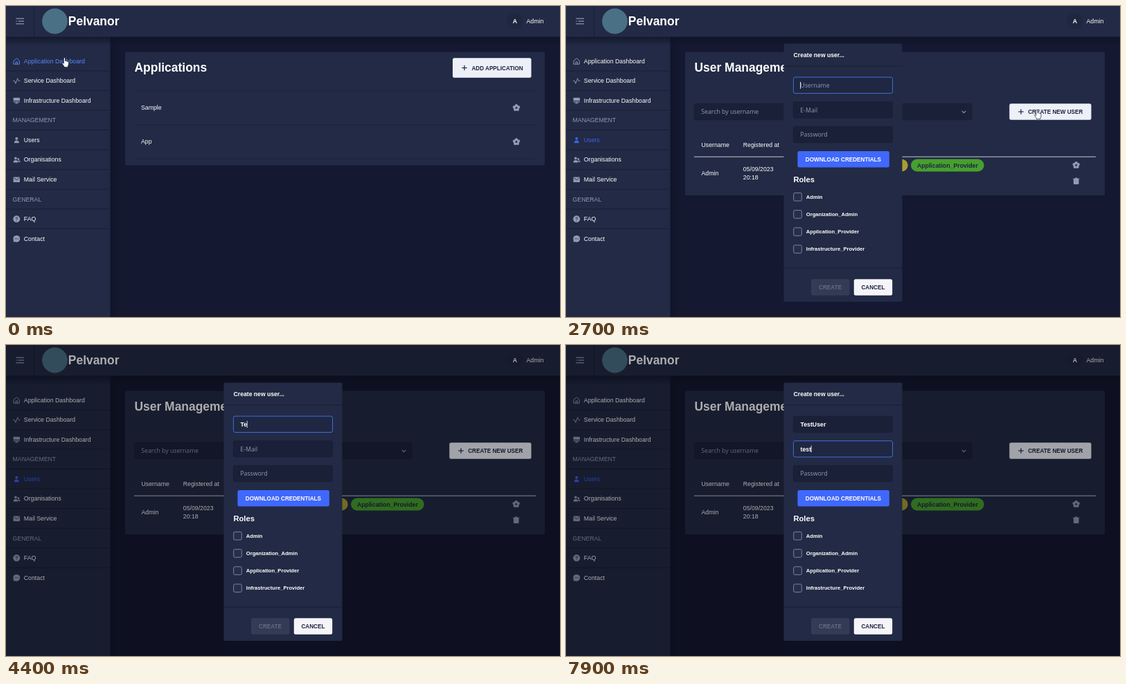
An HTML page for the animation above (8000 ms loop, 800x450 px).

```html
<!DOCTYPE html>
<html lang="en">
<head>
<meta charset="utf-8">
<title>User management</title>
<style>
html, body { margin: 0; width: 100%; height: 100%; overflow: hidden; background: #141830; }
svg { display: block; width: 800px; height: 450px; }
text { font-family: "Liberation Sans", Arial, sans-serif; font-size: 8.75px; fill: #fff; white-space: pre; }
.b { font-weight: 700; }
.o { font-family: "Open Sans", "Noto Sans", sans-serif; fill: #8f9bb3; }
.g { fill: #8f9bb3; }
.h { font-weight: 700; font-size: 17.45px; }
.btn { font-weight: 700; font-size: 8.16px; }
.dark { fill: #1e2540; }
</style>
</head>
<body>
<svg id="stage" viewBox="0 0 800 450" xmlns="http://www.w3.org/2000/svg"></svg>
<script>
const LOOP = 8000, PAGE_AT = 1200, DIALOG_AT = 2700, TAB_AT = 6370, HIDE_AT = 4100;
const GREY = '#8f9bb3', ACTIVE = '#3c63e8', HOVER = '#5c87f8';
const PANEL = '#222a45', LINE = '#181e35', FIELD = '#1a2038';

const text = (x, y, s, cls = '', extra = '') => `<text x="${x}" y="${y}" class="${cls}" ${extra}>${s}</text>`;
const rect = (x, y, w, h, fill, r = 0, extra = '') =>
  `<rect x="${x}" y="${y}" width="${w}" height="${h}" rx="${r}" fill="${fill}" ${extra}/>`;
const line = (x1, y1, x2, y2, c, w = 1) =>
  `<path d="M${x1} ${y1}L${x2} ${y2}" stroke="${c}" stroke-width="${w}"/>`;
const icon = (x, y, body, s = .47) =>
  `<g transform="translate(${x} ${y}) scale(${s}) translate(-12 -12)">${body}</g>`;
const solid = d => `<path d="${d}" fill="currentColor"/>`;
const outline = d =>
  `<path d="${d}" fill="none" stroke="currentColor" stroke-width="2" stroke-linecap="round" stroke-linejoin="round"/>`;
const disc = (x, y, r, fill = 'currentColor') => `<circle cx="${x}" cy="${y}" r="${r}" fill="${fill}"/>`;

const ICONS = {
  home: outline('M3.5 10.5L12 3L20.5 10.5V21H3.5ZM9.5 21V14H14.5V21'),
  pulse: outline('M2 12H6L9 20L15 4L18 12H22'),
  screen: solid('M4 3H20Q22 3 22 5V12H2V5Q2 3 4 3ZM2 14H22V15Q22 17 20 17H13V19H17V21H7V19H11V17H4Q2 17 2 15Z'),
  person: disc(12, 7, 4.2) + solid('M4.5 21Q4.5 13 12 13T19.5 21Z'),
  people: disc(9, 7, 4) + disc(17.5, 10, 3) + solid('M2 20Q2 13 9 13T16 20ZM17.5 19H23Q23 14 17.5 14Q16.5 14 15.8 14.4Q17.5 16.5 17.5 19Z'),
  mail: solid('M4 4H20Q22 4 22 6V18Q22 20 20 20H4Q2 20 2 18V6Q2 4 4 4Z') +
    `<path d="M4 7L12 13L20 7" fill="none" stroke="${PANEL}" stroke-width="2"/>`,
  help: disc(12, 12, 10.5) +
    `<path d="M9 9.5Q9 7 12 7T15 9.5Q15 11.5 12 12V14M12 16.5V18.5" fill="none" stroke="${PANEL}" stroke-width="2"/>`,
  chat: disc(12, 12, 10.5) + solid('M2 22L3 14L10 21Z') + [8, 12, 16].map(x => disc(x, 12, 1.3, PANEL)).join('')
};

const ROW = 28.55;
const menu = [
  ['Application Dashboard', 'home'], ['Service Dashboard', 'pulse'], ['Infrastructure Dashboard', 'screen'],
  ['MANAGEMENT'], ['Users', 'person'], ['Organisations', 'people'], ['Mail Service', 'mail'],
  ['GENERAL'], ['FAQ', 'help'], ['Contact', 'chat']
];

function sidebar() {
  return rect(0, 44, 150.5, 406, PANEL) + menu.map(([label, name], i) => {
    const y = 79.6 + i * ROW;
    const row = name
      ? `<g id="item${i}">${icon(15.3, y + .3, ICONS[name])}${text(25.8, y + 3.1, label)}</g>`
      : text(9.5, y + 3.1, label, 'g');
    return row + (i < 9 ? line(0, y + 14.3, 150, y + 14.3, LINE) : '');
  }).join('');
}

function header() {
  return rect(0, 44, 800, 14, 'url(#down)') + rect(0, 0, 800, 44.5, PANEL) + line(40.5, 0, 40.5, 44, LINE) +
    line(14.5, 18.2, 26, 18.2, GREY, 1.2) + line(17.5, 22, 26, 22, GREY, 1.2) +
    line(14.5, 25.8, 26, 25.8, GREY, 1.2) + disc(15, 22, .8, GREY) +
    disc(70.5, 22, 18.4, '#4a7086') + text(89.8, 28.2, 'Pelvanor', 'h') +
    disc(735, 22, 11.5, '#1f2740') + text(735, 25.1, 'A', 'b', 'text-anchor="middle"') + text(751.5, 25.1, 'Admin');
}

function flower(x, y) {
  let petals = '';
  for (let i = 0; i < 5; i++) {
    const a = (i / 5 - .25) * 2 * Math.PI;
    petals += disc(12 + 6 * Math.cos(a), 12 + 6 * Math.sin(a), 4.6);
  }
  return icon(x, y, petals + disc(12, 12, 6) + disc(12, 12, 2.8, PANEL), .5);
}
const bin = (x, y) => icon(x, y, solid('M2 5H8V3Q8 2 9 2H15Q16 2 16 3V5H22V7H20V20Q20 22 18 22H6Q4 22 4 20V7H2Z'), .48);
const plus = (x, y) => line(x - 3.7, y, x + 3.7, y, '#1e2540', 1.2) + line(x, y - 3.7, x, y + 3.7, '#1e2540', 1.2);

function applications() {
  const rows = ['Sample', 'App'].map((s, i) => {
    const y = 147.3 + i * 49.2;
    return text(195, y + 2.8, s) + flower(737, y) + line(185, y + 24.6, 765, y + 24.6, '#1c233b');
  }).join('');
  return rect(172, 66.5, 606, 164, PANEL, 1.5) + text(185.5, 95.2, 'Applications', 'h') +
    rect(645, 75.3, 113.5, 28.5, '#edf0f7', 2.5) + plus(662, 89.5) +
    text(672.4, 92.5, 'ADD APPLICATION', 'btn dark') + line(185, 123, 765, 123, '#1c233b') + rows;
}

const chip = (x, y, w, fill, s) => rect(x, y, w, 18, fill, 9) + text(x + 8.9, y + 12.1, s, 'b dark');

function users() {
  const edge = 'stroke="#171d33" stroke-width=".7"';
  return rect(172, 66.5, 606, 207.5, PANEL, 1.5) + text(185.5, 95.2, 'User Management', 'h') +
    rect(185.2, 141.2, 193.3, 23.6, FIELD, 2.5, edge) + text(195.3, 156, 'Search by username', 'o') +
    rect(392, 141.2, 194, 23.6, FIELD, 2.5, edge) + text(403.3, 156, 'Multiple Select', 'o', 'style="font-size:8.45px"') +
    `<path d="M571.7 151.8L574.5 154.6L577.3 151.8" fill="none" stroke="${GREY}" stroke-width="1.1"/>` +
    rect(640.3, 141.2, 118.2, 23.6, '#edf0f7', 2.5) + plus(657, 153) + text(667.2, 156, 'CREATE NEW USER', 'btn dark') +
    text(195.5, 204, 'Username') + text(255.8, 204, 'Registered at') + text(340, 204, 'Roles') +
    line(185, 218.2, 765, 218.2, '#c5c8d3') +
    text(195.5, 244.7, 'Admin') + text(255.8, 239, '05/09/2023') + text(255.8, 250.5, '20:18') +
    chip(340, 221.5, 45, '#d8626a', 'Admin') + chip(389.7, 221.5, 104, '#a89e32', 'Organization_Admin') +
    chip(498, 221.5, 105.7, '#479f2f', 'Application_Provider') +
    chip(340, 244, 115.5, '#3b94a6', 'Infrastructure_Provider') +
    flower(736.7, 230.3) + bin(736.7, 253.2);
}

const fieldY = [103, 138.7, 174.3];
const hints = ['Username', 'E-Mail', 'Password'];

function dialog() {
  const fields = hints.map((s, i) =>
    rect(328.4, fieldY[i], 143.2, 23.4, FIELD, 2.5, 'stroke="#171d33" stroke-width=".7"') +
    rect(328.4, fieldY[i], 143.2, 23.4, '#1f2743', 2.5, `id="ring${i}" stroke="#4472d8"`) +
    text(338.3, fieldY[i] + 14.8, s, 'o', `id="hint${i}"`) +
    text(338.5, fieldY[i] + 14.8, '', 'b', `id="value${i}"`)).join('');
  const roles = ['Admin', 'Organization_Admin', 'Application_Provider', 'Infrastructure_Provider'].map((s, i) => {
    const y = 276.2 + i * 25.2;
    return rect(328.7, y - 5.8, 11.6, 11.6, '#262e4b', 1.8, `stroke="${GREY}" stroke-width=".8"`) +
      text(346.8, y + 2.6, s, 'b', 'style="font-size:7.6px"');
  }).join('');
  return rect(314.5, 54.5, 171, 373.5, PANEL, 2) + text(328.6, 73.6, 'Create new user...', 'b', 'style="font-size:8.65px"') +
    line(314.5, 87, 485.5, 87, LINE) + line(314.5, 379.3, 485.5, 379.3, LINE) + fields +
    rect(334.4, 210, 132.5, 23.5, '#4068fc', 2.5) + text(345.8, 224.6, 'DOWNLOAD CREDENTIALS', 'btn') +
    text(328.4, 255, 'Roles', 'b', 'style="font-size:11.2px"') + roles +
    rect(354, 395.2, 55.5, 23.5, '#343c55', 2.5) + text(365, 409.9, 'CREATE', 'btn', 'style="fill:#646c85"') +
    rect(415.8, 395.2, 55.4, 23.5, '#f5f4f9', 2.5) + text(426.4, 409.9, 'CANCEL', 'btn dark') +
    rect(0, 0, .8, 10, '#fff', 0, 'id="caret"');
}

const stage = document.getElementById('stage');
stage.innerHTML = `<defs>
  <linearGradient id="down" x2="0" y2="1"><stop stop-color="#0f1326" stop-opacity=".75"/><stop offset="1" stop-color="#0f1326" stop-opacity="0"/></linearGradient>
  <linearGradient id="right"><stop stop-color="#0f1326" stop-opacity=".65"/><stop offset="1" stop-color="#0f1326" stop-opacity="0"/></linearGradient>
  </defs>` + rect(0, 0, 800, 450, '#141830') + rect(150, 44, 15, 406, 'url(#right)') + sidebar() + header() +
  `<g color="${GREY}"><g id="apps">${applications()}</g><g id="users">${users()}</g></g>` +
  rect(0, 0, 800, 450, '#000', 0, 'id="shade"') + `<g id="dialog">${dialog()}</g>` +
  `<g id="cursor" fill="#fff" stroke="#15182a" stroke-width=".7" stroke-linejoin="round">
  <path id="arrow" d="M0 0V10.8L2.5 8.5L4.2 12.2L6 11.4L4.4 7.9H7.8Z"/>
  <path id="hand" d="M-1.1 1Q-1.1 0 0 0T1.1 1V4.6Q2.2 4 2.9 5Q4 4.6 4.5 5.6Q6 5.2 6 6.8V9.2Q6 11 4.9 12V13.6H-.6V12.4Q-1.8 11 -3.4 8.4Q-3.6 7 -2.4 7.2L-1.1 8.4Z"/></g>`;

const el = id => document.getElementById(id);
const show = (id, on) => el(id).setAttribute('visibility', on ? 'visible' : 'hidden');
const clamp = v => Math.max(0, Math.min(1, v));
const smooth = v => v * v * (3 - 2 * v);

// time, x, y of the pointer tip
const path = [[0, 84.5, 74.8], [330, 198, 128], [700, 60, 193], [1300, 60, 193], [1900, 499, 233], [2350, 680, 150], [LOOP, 680, 150]];
function pointer(t) {
  const i = path.findIndex(p => t < p[0]);
  const a = path[i - 1], b = path[i];
  const k = smooth((t - a[0]) / (b[0] - a[0]));
  return [a[1] + (b[1] - a[1]) * k, a[2] + (b[2] - a[2]) * k];
}

const words = [
  { s: 'TestUser', at: [4100, 4300, 4600, 4800, 5100, 5300, 5500, 5700] },
  { s: 'test', at: [7100, 7400, 7600, 7800] },
  { s: '', at: [] }
];

function drawDialog(t) {
  show('dialog', t >= DIALOG_AT);
  el('shade').setAttribute('opacity', .32 * (1 - Math.pow(1 - clamp((t - DIALOG_AT) / 400), 1.5)));
  const moved = clamp((t - TAB_AT) / 150);
  const focus = t < TAB_AT ? 0 : 1;
  let last = focus ? TAB_AT : DIALOG_AT;
  words.forEach(({ s, at }, i) => {
    const typed = at.filter(k => k <= t);
    el('value' + i).textContent = s.slice(0, typed.length);
    el('hint' + i).setAttribute('opacity', typed.length ? 0 : 1);
    el('ring' + i).setAttribute('opacity', [1 - moved, moved, 0][i]);
    if (i === focus) last = Math.max(last, ...typed);
  });
  const value = el('value' + focus);
  const width = value.textContent ? value.getComputedTextLength() : 0;
  el('caret').setAttribute('x', 338.2 + width);
  el('caret').setAttribute('y', fieldY[focus] + 6.8);
  el('caret').setAttribute('opacity', t >= DIALOG_AT && (t - last) % 1060 < 530 ? 1 : 0);
}

function draw(t) {
  const [x, y] = pointer(t);
  const onUsers = t >= PAGE_AT;
  show('apps', !onUsers);
  show('users', onUsers);
  const over = x < 150 ? Math.round((y - 79.6) / ROW) : -1;
  menu.forEach(([, name], i) => {
    if (!name) return;
    const active = i === (onUsers ? 4 : 0);
    const c = over === i ? HOVER : active ? ACTIVE : '';
    el('item' + i).style.color = c || GREY;
    el('item' + i).lastChild.style.fill = c || '#fff';
  });
  const hand = (over >= 0 && menu[over][1]) || (x > 640 && x < 758 && y > 141 && y < 165);
  el('cursor').setAttribute('transform', `translate(${x} ${y})`);
  el('hand').setAttribute('opacity', hand ? 1 : 0);
  el('arrow').setAttribute('opacity', hand ? 0 : 1);
  show('cursor', t < HIDE_AT);
  drawDialog(t);
}

const start = performance.now();
function tick() {
  draw((performance.now() - start) % LOOP);
  requestAnimationFrame(tick);
}
tick();
</script>
</body>
</html>
```
